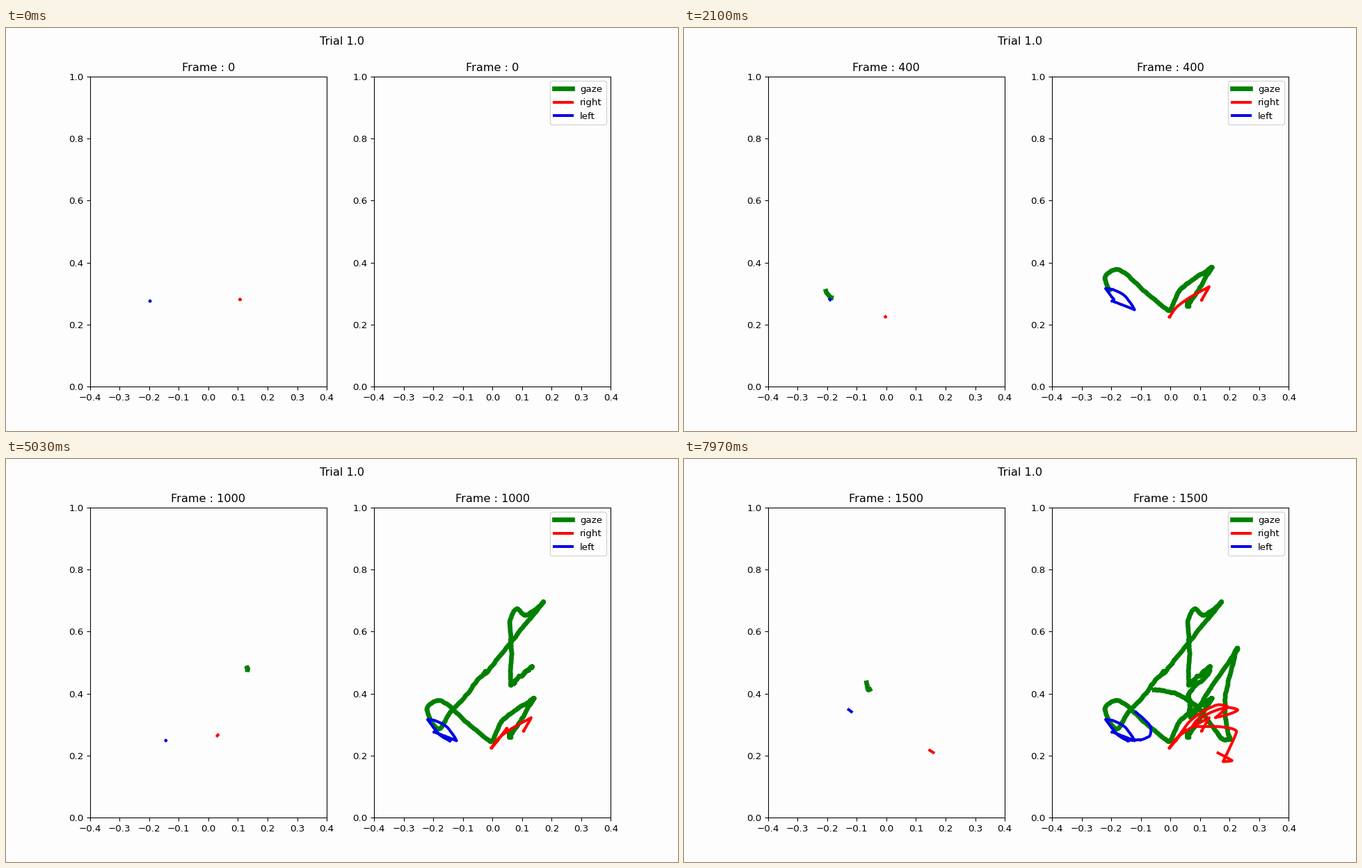
A matplotlib script for the animation above (8000 ms loop, 966 by 580 pixels).

```python
import numpy as np
import matplotlib.pyplot as plt
from matplotlib.animation import FuncAnimation

FRAMES, LOOP_MS = 240, 8000
RATE = 20 / 3          # samples per drawn frame (200 Hz data at 30 fps)
WINDOW = 10            # samples shown in the left panel
PAPER = "#fdfdfd"
rng = np.random.default_rng(4)

# Turning points of each track: sample, x, y
GAZE = [
    (30, .060, .275), (150, .058, .259), (205, .141, .385), (286, .028, .309),
    (320, -.005, .247), (360, -.083, .305), (390, -.18, .379),
    (405, -.221, .352), (430, -.184, .287), (455, -.135, .345),
    (520, -.022, .472), (560, -.025, .462), (650, .173, .695),
    (685, .110, .652), (700, .085, .673), (715, .059, .640),
    (742, .063, .569), (764, .063, .561), (810, .063, .428),
    (980, .133, .487), (1020, .131, .467), (1090, .063, .400),
    (1190, .070, .323), (1270, .225, .544), (1400, .183, .338),
    (1440, .200, .251), (1460, .185, .249), (1515, .084, .361),
    (1565, -.01, .409), (1595, -.06, .412), (1605, -.071, .450),
]
RIGHT = [
    (0, .107, .281), (130, .105, .279), (200, .131, .322), (286, .025, .260),
    (320, -.003, .225), (600, -.003, .225), (740, .0144, .2445),
    (900, .049, .288), (1090, .018, .248), (1150, .074, .318),
    (1200, .165, .364), (1225, .192, .358), (1260, .152, .322),
    (1330, .227, .347), (1350, .195, .355), (1396, .087, .312),
    (1430, .074, .294), (1470, .154, .294), (1505, .223, .278),
    (1550, .178, .181), (1570, .208, .184), (1595, .155, .212),
    (1605, .143, .219),
]
LEFT = [
    (0, -.197, .276), (60, -.196, .276), (190, -.121, .248),
    (250, -.156, .294), (286, -.199, .314), (320, -.219, .316),
    (410, -.193, .283), (546, -.1745, .264), (700, -.144, .248),
    (1100, -.144, .249), (1386, -.102, .251), (1440, -.100, .251),
    (1490, -.069, .265), (1530, -.066, .287), (1595, -.120, .343),
    (1605, -.131, .350),
]


def glide(t, when, where):
    """Cubic easing through the points that never overshoots a turn."""
    h, d = np.diff(when), np.diff(where) / np.diff(when)
    total = d[:-1] + d[1:]
    turn = 2 * np.maximum(d[:-1] * d[1:], 0) / np.where(total == 0, 1, total)
    m = np.concatenate([[0], turn, d[-1:]])
    k = np.clip(np.searchsorted(when, t, "right") - 1, 0, len(h) - 1)
    f = np.clip((t - when[k]) / h[k], 0, 1)
    step = f * f * (3 - 2 * f)
    return (where[k] + step * (where[k + 1] - where[k])
            + h[k] * f * (1 - f) * (m[k] * (1 - f) - m[k + 1] * f))


def track(keys, tremor, gap=(0, 0)):
    t = np.arange(int(FRAMES * RATE) + WINDOW)
    when, *coords = np.array(keys).T
    soft = np.ones(15) / 15
    xy = np.column_stack([
        glide(t, when, c)
        + np.convolve(rng.normal(0, tremor, t.size), soft, "same")
        for c in coords])
    xy[gap[0]:gap[1]] = np.nan
    return xy


tracks = [track(GAZE, .006, (0, 30)), track(RIGHT, .001, (500, 650)),
          track(LEFT, .001)]
STYLES = [("gaze", "g", 5), ("right", "r", 3), ("left", "#0000e6", 3)]

# A 10 x 6 inch figure that fills 966 x 580 pixels
fig, axes = plt.subplots(1, 2, figsize=(10.0002, 6.0042), dpi=96.6,
                         facecolor=PAPER)
fig.suptitle("Trial 1.0")
lines = []
for ax in axes:
    ax.set(xlim=(-.4, .4), ylim=(0, 1), facecolor=PAPER)
    lines.append([ax.plot([], [], color=c, lw=w, label=name)[0]
                  for name, c, w in STYLES])
axes[1].legend(loc="upper right")


def draw(n):
    i = int(n * RATE + 1e-6)
    for ax in axes:
        ax.set_title(f"Frame : {i // 100 * 100}")
    for xy, now, trail in zip(tracks, *lines):
        now.set_data(*xy[i:i + WINDOW].T)
        trail.set_data(*xy[:i].T)
    return lines[0] + lines[1]


anim = FuncAnimation(fig, draw, frames=FRAMES, interval=LOOP_MS / FRAMES,
                     init_func=lambda: draw(0), repeat=True, repeat_delay=0,
                     blit=False)
plt.show()
```
